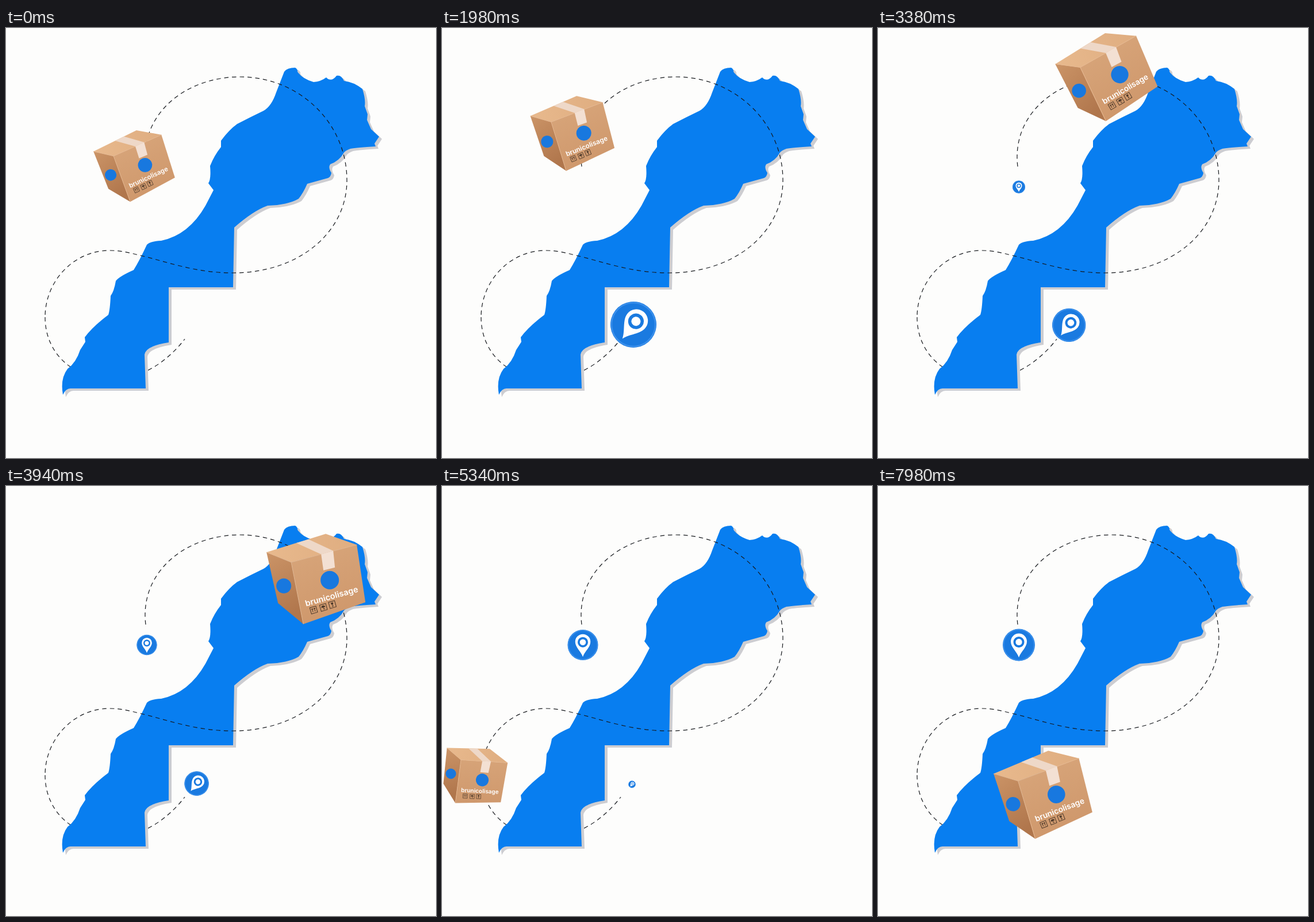
Recreate the animation shown at these times as an HTML page. Size 748 px wide and 748 px high, loop 8000 ms.

```html
<!DOCTYPE html>
<html lang="fr">
<head>
<meta charset="utf-8">
<title>Livraison</title>
<style>
  html, body { margin: 0; width: 100%; height: 100%; overflow: hidden; background: #fdfdfc; }
  svg { display: block; width: 100vw; height: 100vh; }
  .route { fill: none; stroke: #15181c; stroke-width: 1.2; stroke-dasharray: 7.5 6; }
  .brand { font: 600 14.5px Inter, Lato, sans-serif; fill: #fff; text-anchor: middle; }
  .icon { fill: none; stroke: #4b382a; stroke-width: 1; }
  .mark { fill: #1878df; }
</style>
</head>
<body>
<svg viewBox="0 0 748 748">
  <defs>
    <linearGradient id="front" x1="0" y1="0" x2=".3" y2="1">
      <stop offset="0" stop-color="#d8a67b"/><stop offset="1" stop-color="#cf986c"/>
    </linearGradient>
    <linearGradient id="side" x1="0" y1="0" x2=".3" y2="1">
      <stop offset="0" stop-color="#cb9467"/><stop offset="1" stop-color="#b0764c"/>
    </linearGradient>
    <linearGradient id="lid" x1="0" y1="0" x2="1" y2="0">
      <stop offset="0" stop-color="#e8b98d"/><stop offset="1" stop-color="#dfad80"/>
    </linearGradient>
    <path id="land" d="M484,76Q489,69 503,69Q508,72 507,76Q515,88 535,94Q548,93 557,86Q566,95 575,83
      Q583,81 588,92Q605,94 620,106Q626,125 624,136L629,150 628,160 635,176 649,189 641,201 643,206
      Q610,208 599,210Q590,213 587,218Q580,231 564,237Q560,243 566,252Q565,259 560,261L524,271
      Q517,287 509,297Q490,308 455,309Q430,318 397,347L395,451H283V547Q243,553 241,568L243,627H112
      Q104,627 99,638Q94,610 107,593Q122,582 129,560L138,546 137,538Q150,520 178,499Q181,490 182,466
      Q188,458 191,440Q197,432 222,421Q232,405 245,377Q250,371 270,370Q318,360 347,309L361,282 352,270
      Q357,263 355,240Q362,222 374,207V196Q388,177 402,167Q425,155 448,144Q462,136 470,112Z"/>
    <path id="track" d="M223,237.5C206,150 295,82 390,82C490,82 576,170 576,262C576,350 498,424 385,424
      C320,424 275,405 228,393C208,389 190,387 168,387C106,387 55,430 55,495C55,545 105,594 165,594
      C220,594 262,572 287,534"/>
    <g id="pin">
      <circle r="1" fill="#1a7ae0"/>
      <circle r=".95" fill="none" stroke="#3b90ec" stroke-width=".06"/>
      <path fill="#fff" d="M0,.78C-.12,.42-.5,.15-.5,-.21A.5,.5 0 0 1 .5,-.21C.5,.15 .12,.42 0,.78Z"/>
      <circle cy="-.18" r=".27" fill="#fff" stroke="#1a7ae0" stroke-width=".14"/>
    </g>
    <rect id="frame" class="icon" x="-5.5" y="-5.5" width="11" height="11"/>
  </defs>

  <path class="route" d="M68,503C68,540 85,570 110,588C150,615 200,620 246,596C272,583 295,562 311,541"/>
  <use href="#land" x="5" y="4" fill="#cdcdd1"/>
  <use href="#land" fill="#087ef0"/>
  <path class="route" d="M243,241C232,150 312,85 407,85C510,85 593,165 593,265C593,355 510,426 395,426
    C330,426 285,408 235,396C215,391 200,387 180,387C118,387 68,440 68,503"/>

  <use id="startPin" href="#pin"/>
  <use id="endPin" href="#pin"/>

  <g id="parcel">
    <path fill="url(#lid)" d="M-86-43.5L17-75.5L71-56.5L-43-26Z"/>
    <path fill="url(#side)" d="M-86-43.5L-43-26L-22,81.5L-66,45Z"/>
    <path fill="url(#front)" d="M-43-26L71-56.5L86,43.5L-22,81.5Z"/>
    <path fill="none" stroke="#e6b890" d="M-86-43.5L-43-26L71-56.5M-43-26L-22,81.5"/>
    <path fill="#eed8c8" d="M-34-59.6L-13-66L30-46L9-40Z"/>
    <path fill="#f3e0d3" d="M9-40L30-46L33-17L13-12Z"/>
    <circle class="mark" cx="-56" cy="15" r="13"/>
    <circle class="mark" cx="24" cy="5" r="16"/>
    <text class="brand" transform="translate(28.5 38) rotate(-15.6)">brunicolisage</text>
    <g transform="translate(-4 57) rotate(-16)">
      <use href="#frame"/><path class="icon" d="M-2,3V-3M2,3V-3M-3.5-1.5L-2-3L-.5-1.5M.5-1.5L2-3L3.5-1.5"/>
    </g>
    <g transform="translate(13 52.5) rotate(-16)">
      <use href="#frame"/><path class="icon" d="M0,0V3H2"/><path fill="#4b382a" d="M-3.5,0A3.5,3.5 0 0 1 3.5,0Z"/>
    </g>
    <g transform="translate(28.5 47.5) rotate(-16)">
      <use href="#frame"/><path class="icon" d="M0,0V3M-1.5,3H1.5"/><path fill="#4b382a" d="M-2.2-3.5H2.2L1.5,0H-1.5Z"/>
    </g>
  </g>
</svg>
<script>
  const LOOP = 8000, DEPART = 420, SWAP = 2700, ARRIVE = 6600;
  const track = document.getElementById('track');
  const trackLength = track.getTotalLength();

  // Sway of the parcel on its way.
  const sway = [
    { at: 0, scale: .772, angle: -9 },
    { at: 1980, scale: .813, angle: -6 },
    { at: 2820, scale: .891, angle: -29 },
    { at: 3940, scale: 1, angle: 0 },
    { at: 5340, scale: .69, angle: 18.5 },
    { at: 6560, scale: .907, angle: 0 },
    { at: LOOP, scale: .957, angle: -5.5 }
  ];

  const progress = (t, from, to) => Math.min(1, Math.max(0, (t - from) / (to - from)));
  const smooth = u => u * u * (3 - 2 * u);
  const mix = (a, b, u) => a + (b - a) * u;

  // Same curve as CSS cubic-bezier(x1, 0, x2, 1).
  function ease(x, x1, x2) {
    let low = 0, high = 1;
    for (let i = 0; i < 24; i++) {
      const u = (low + high) / 2, v = 1 - u;
      if (3 * v * v * u * x1 + 3 * v * u * u * x2 + u ** 3 < x) low = u;
      else high = u;
    }
    return smooth(low);
  }

  function swayAt(t) {
    const i = sway.findIndex(key => key.at > t);
    const a = sway[i - 1], b = sway[i];
    const u = smooth(progress(t, a.at, b.at));
    return [mix(a.scale, b.scale, u), mix(a.angle, b.angle, u)];
  }

  function place(id, x, y, scale, angle) {
    const node = document.getElementById(id);
    node.style.display = scale > .01 ? '' : 'none';
    node.setAttribute('transform', `translate(${x} ${y}) rotate(${angle}) scale(${scale})`);
  }

  function draw() {
    const t = performance.now() % LOOP;
    const travelled = ease(progress(t, DEPART, ARRIVE), .833, .651);
    const { x, y } = track.getPointAtLength(trackLength * travelled);
    place('parcel', x, y, ...swayAt(t));

    // The destination pin pops up, then shrinks away while the departure pin grows.
    const left = 1 - progress(t, SWAP, ARRIVE);
    const popped = 1 - (1 - progress(t, 0, 1950)) ** 2;
    const endRadius = 40 * popped * left ** 1.65;
    place('startPin', 245, 276.5, 28 * (1 - left ** 2.6), 0);
    place('endPin', 330 + endRadius * .075, 519.5 - endRadius * .09, endRadius, 38);
    requestAnimationFrame(draw);
  }
  draw();
</script>
</body>
</html>
```
